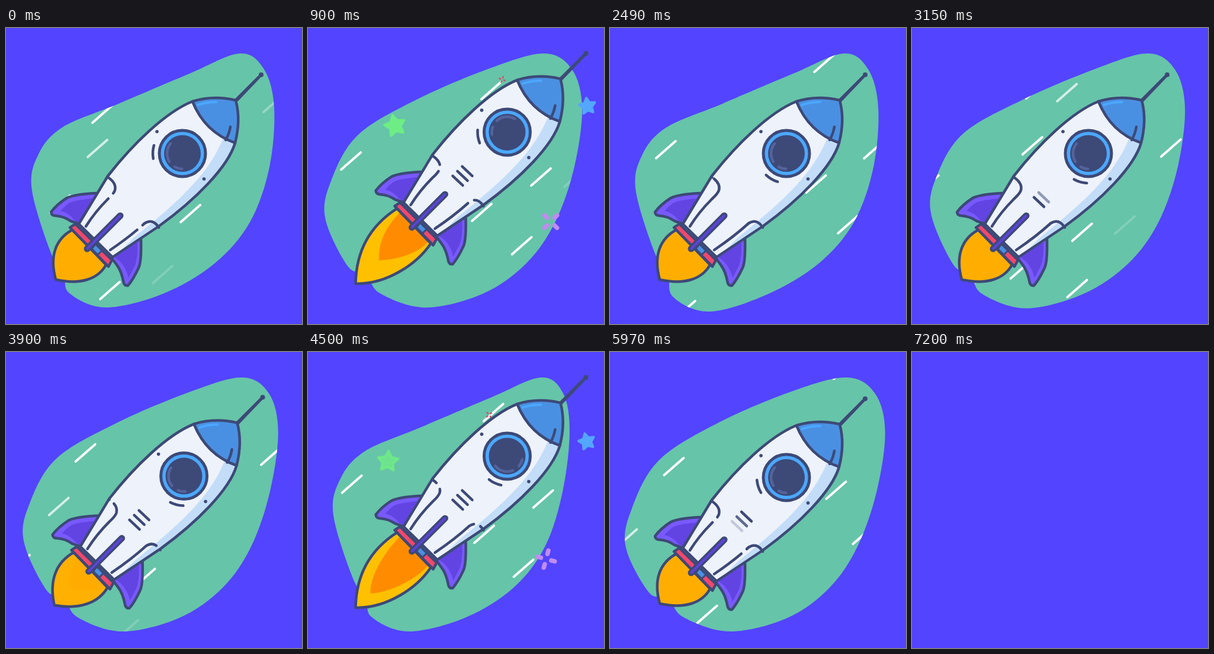
An HTML page with a canvas for the animation above (7230 ms loop, 500 by 500 pixels).

```html
<!DOCTYPE html>
<html>
<head>
<meta charset="utf-8">
<style>
  html, body { margin: 0; height: 100%; overflow: hidden; background: #5344ff; }
  canvas { display: block; }
</style>
</head>
<body>
<canvas id="stage" width="500" height="500"></canvas>
<script>
const ctx = document.getElementById('stage').getContext('2d');
const LOOP = 7230, END = 7200, DARK = '#3d4977', TAU = Math.PI * 2;
const clamp = v => Math.max(0, Math.min(1, v));
const mix = (a, b, k) => a + (b - a) * k;
const mod = (a, n) => ((a % n) + n) % n;
const ramp = (t, from, to) => { const v = clamp((t - from) / (to - from)); return v * v * (3 - 2 * v); };
const cubicInOut = u => u < .5 ? 4 * u ** 3 : 1 - 4 * (1 - u) ** 3;
const near = (v, center, width) => Math.exp(-(((v - center) / width) ** 2));
const wave = (t, period) => Math.cos(TAU * t / period);

function shape(d, fill, width = 0, stroke = DARK) {
  const path = d instanceof Path2D ? d : new Path2D(d);
  if (fill) { ctx.fillStyle = fill; ctx.fill(path); }
  if (width) { ctx.strokeStyle = stroke; ctx.lineWidth = width; ctx.stroke(path); }
}

function arc(x, y, r, from, to, ...style) {
  const path = new Path2D();
  path.arc(x, y, r, from * TAU / 360, to * TAU / 360);
  shape(path, ...style);
}
const circle = (x, y, r, ...style) => arc(x, y, r, 0, 360, ...style);

// Key points of the blob, clockwise from the top
const BLOB = [
  [395, 43], [436, 70], [453, 135], [445, 235], [412, 328], [352, 398], [265, 449], [168, 472],
  [106, 447], [99, 410], [78, 385], [44, 275], [54, 215], [95, 168], [190, 128], [310, 77]
];

// The blob swells and returns; it also sags once and is squeezed once per loop
function blobPath(t) {
  const phase = mod(t, 2400) / 2400;
  const swell = (1 - Math.cos(TAU * Math.min(1, Math.max(phase, .5 + (phase - .5) * 1.15)))) / 2;
  const sag = 10 * near(t, 2250, 700), squeeze = 15 * near(t, 4500, 500);
  const at = n => {
    const i = mod(n, BLOB.length), [x, y] = BLOB[i];
    return [
      x + swell * (38 * near(i, 6.5, 1.8) + 13 * near(i, 1.5, 1.5) - 18 * near(i, 11.5, 2.4)) - squeeze * near(i, 3, 2),
      y + swell * (60 * near(i, 11.4, 1.4) - 14 * near(i, 14.5, 1)) + sag * near(i, 7.5, 1)
    ];
  };
  const path = new Path2D();
  path.moveTo(...at(0));
  for (let i = 0; i < BLOB.length; i++) {
    const [p0, p1, p2, p3] = [at(i - 1), at(i), at(i + 1), at(i + 2)];
    path.bezierCurveTo(
      p1[0] + (p2[0] - p0[0]) / 6, p1[1] + (p2[1] - p0[1]) / 6,
      p2[0] - (p3[0] - p1[0]) / 6, p2[1] - (p3[1] - p1[1]) / 6, ...p2);
  }
  return path;
}

// Lanes of streaks: x, y, speed, opacity
const LANES = [
  [146, 160, .1], [138, 218, .23, .72], [75, 312, .24], [295, 328, .27], [435, 142, .27, .32],
  [248, 431, .204, .18], [159, 458, .24], [502, 128, .25], [512, 235, .186]
];

function streaks(t) {
  const period = 1808, slope = .88;
  for (const [x, y, speed, alpha = 1] of LANES) {
    ctx.globalAlpha = alpha;
    for (const age of [t % period, t % period - period]) {
      const move = age * speed;
      shape(`M${x - move},${y + move * slope} l33,-29`, null, 4, '#fff');
    }
  }
  ctx.globalAlpha = 1;
}

function star(r, color) {
  const path = new Path2D();
  for (let i = 0; i < 10; i++) {
    const a = i * TAU / 10 - TAU / 4, d = i % 2 ? r * .52 : r;
    path.lineTo(d * Math.cos(a), d * Math.sin(a));
  }
  path.closePath();
  shape(path, color, 4, color);
}

function sparks(r, color) {
  for (let i = 0; i < 4; i++) {
    ctx.rotate(TAU / 4);
    shape(`M${r * .6},0 L${r},0`, null, r * .5, color);
  }
}

function stars(t) {
  const time = t % 3540, dt = time - 900;
  const fall = (x, y, vx, vy, from, to, angle, spin, draw, ...style) => {
    if (time < from || time > to) return;
    const scale = ramp(time, from, from + 150);
    ctx.save();
    ctx.translate(x + vx * dt, y + vy * dt);
    ctx.rotate((angle + spin * dt) * TAU / 360);
    ctx.scale(scale, scale);
    ctx.globalAlpha = 1 - ramp(time, to - 250, to);
    draw(...style);
    ctx.restore();
  };
  fall(147, 165, -.2, .33, 470, 1130, -14, .3, star, 18, '#6fee85');
  fall(472, 132, -.02, .32, 560, 1350, -8, -.1, star, 14, '#54a6ff');
  fall(410, 327, -.13, .38, 380, 1420, 45, -.5, sparks, 15, '#c08cf0');
  fall(328, 87, -.37, .32, 680, 1200, 20, .5, sparks, 5, '#d0506a');
}

function flame(t, time) {
  const e = ramp(time, 150, 850) * (1 - ramp(time, 1400, 1880));
  const m = (a, b) => mix(a, b, e);
  const outer = `M112,341 C${m(84, 76)},${m(356, 364)} ${m(73, 43)},${m(385, 402)} ${m(84, 42)},${m(425, 468)}` +
    ` C${m(125, 96)},${m(434, 469)} ${m(155, 146)},${m(425, 434)} 169,400 Z`;
  shape(outer, `rgb(255,${m(174, 192)},0)`);
  if (e > .02) {
    const k = (1 + wave(t, 1500)) / 2;
    const x = m(110, mix(83, 67, k)), y = m(400, mix(427, 444, k));
    ctx.globalAlpha = e;
    shape(`M122,343 C${m(115, 94)},${m(360, 368)} ${x - 2},${y - 30} ${x},${y}` +
      ` C${x + 40},${y - 2} 155,412 167,393 Z`, '#ff8c00');
    ctx.globalAlpha = 1;
  }
  shape(outer, null, 4.5);
}

// Panel seams with a gap that slides along them
function seams(t) {
  const gap = 14 + 22 * wave(t + 600, END);
  ctx.setLineDash([Math.max(0, gap), clamp((gap + 9) / 9) * 12, 999, 0]);
  shape('M172,252 Q187,262 184,274 Q182,280 172,289 Q150,311 135,335', null, 4.5);
  shape('M258,337 Q248,321 234,330 Q210,352 176,375', null, 4.5);
  ctx.setLineDash([]);
}

function stripes(t) {
  for (let i = 0; i < 3; i++) {
    const lit = (on, off) =>
      ramp(t, on + i * 150, on + 250 + i * 150) * (1 - ramp(t, off + i * 100, off + 250 + i * 100));
    ctx.globalAlpha = lit(300, 1550) + lit(2870, 5800);
    shape(`M${206 + i * 8},${286 - i * 8} l17,16`, null, 4.5);
  }
  ctx.globalAlpha = 1;
}

function porthole(t, lift) {
  const x = 298, y = 212, swing = wave(t, END);
  const mark = 143 + 40 * swing, shine = 182 + 120 * lift * swing;
  circle(x, y, 39, '#4ba8ff', 5);
  circle(x, y, 31, DARK);
  arc(x, y, 26, shine - 34, shine + 38, null, 4.5, '#55639b');
  arc(x, y, 26, shine - 90, shine - 62, null, 4.5, '#55639b');
  arc(x, y, 50, mark - 13, mark + 13, null, 4.5);
}

function fin(outline, inner) {
  shape(outline, '#7859ff');
  shape(inner, '#6244e2');
  shape(outline, null, 4.5);
}

function rocket(t) {
  const time = t % 3600;
  const lift = cubicInOut(clamp(1 - Math.abs(time - 1200) / 1200));
  ctx.save();
  ctx.translate(41 * lift, -38.5 * lift);
  flame(t, time);

  fin('M152,279 Q115,281 103,287 C92,294 82,303 76,311 Q77,317 83,317 Q98,318 109,326 L124,331',
    'M146,288 Q114,291 106,296 Q98,302 92,309 Q106,312 115,324 L124,329 Z');
  fin('M228,356 Q229,395 224,405 C218,418 212,428 206,435 Q201,436 199,431 Q195,410 187,400 L178,388',
    'M222,362 Q223,390 217,403 L207,422 Q203,405 192,394 L182,386 Z');

  const hull = 'M315,124 C270,142 215,195 172,250 L123,331 L180,387 L258,335 C320,290 375,235 387,194 Q336,176 315,124 Z';
  shape(hull, '#eef2fa');
  shape('M367,186 C345,240 305,283 215,355 L190,380 L258,335 C320,290 375,235 387,194 Z', '#c3ddf8');
  shape(hull, null, 4.5);

  // Antenna and nose
  shape('M386,121 L429,78 L432,81 L390,125 Z', DARK, 1);
  circle(431, 79, 3, DARK, 2);
  shape('M315,124 Q350,113 388,122 Q397,155 387,194 Q336,176 315,124 Z', '#4a90e2', 4.5);
  shape('M324,130 Q338,125 355,125', null, 4, '#4ba8ff');
  shape('M379,167 Q377,179 371,189', null, 4.5);

  seams(t);
  stripes(t);
  circle(255, 175, 2.8, DARK);
  circle(334.5, 255, 2.8, DARK);
  porthole(t, lift);

  // Nozzle ring and middle fin
  shape('M117,331 L179,392 L173,403 L108,337 Z', '#f0486b', 4.5);
  shape('M151,365 L162,376 L155,383 L145,373 Z', '#4a90e2', 3);
  shape('M193,317 L137,373', null, 11);
  shape('M192.5,317.5 L137.5,372.5', null, 4, '#5d43db');
  ctx.restore();
}

function draw(t) {
  ctx.fillStyle = '#5344ff';
  ctx.fillRect(0, 0, 500, 500);
  if (t >= END) return;
  ctx.lineJoin = ctx.lineCap = 'round';
  const blob = blobPath(t);
  shape(blob, '#66c4a8');
  ctx.save();
  ctx.clip(blob);
  streaks(t);
  ctx.restore();
  stars(t);
  rocket(t);
}

function frame() {
  draw(Math.floor(performance.now() % LOOP / 30) * 30);
  requestAnimationFrame(frame);
}
frame();
</script>
</body>
</html>
```
